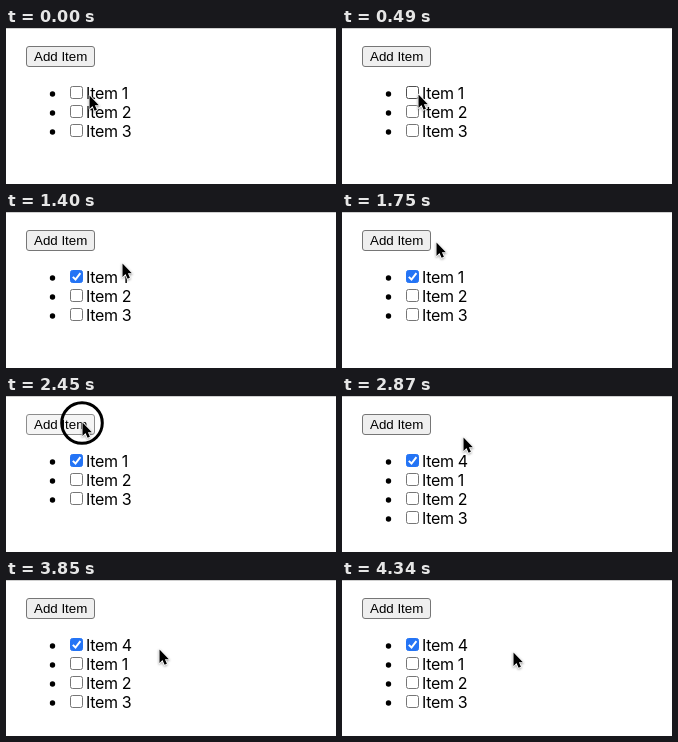
An HTML page that plays this animation: 330x156 px, repeating every 4.41 s.

```html
<!DOCTYPE html>
<html lang="en">
<head>
<meta charset="utf-8">
<title>Checkbox list</title>
<style>
html, body { margin: 0; width: 100%; height: 100%; overflow: hidden; background: #fff; }
svg { display: block; width: 330px; height: 156px; }
.label { font: 13.333px "Liberation Sans", Arial, sans-serif; }
.item { font: 16px Inter, Roboto, sans-serif; letter-spacing: -.35px; }
.button { fill: #efefef; stroke: #767676; }
.button.hover { fill: #e5e5e5; stroke: #4f4f4f; }
.button.active { fill: #f5f5f5; stroke: #8d8d8d; }
.box { fill: #fff; stroke: #767676; }
.hover .box { stroke: #4f4f4f; }
.checked .box { fill: #2474f5; stroke: #2474f5; }
.checked.hover .box { fill: #1b5cc5; stroke: #1b5cc5; }
.tick { fill: none; stroke: #fff; stroke-width: 2; visibility: hidden; }
.checked .tick { visibility: visible; }
#cursor { filter: drop-shadow(0 1px 1px rgba(0, 0, 0, .35)); }
</style>
</head>
<body>
<svg viewBox="0 0 330 156">
  <path d="M0 .5H330" stroke="#d0d0d0"/>
  <rect id="button" class="button" x="20.5" y="18.5" width="68" height="20" rx="2.5"/>
  <text class="label" x="28" y="33">Add Item</text>
  <g id="list"></g>
  <g id="cursor">
    <path d="M0 0V13.4L3 10.6 5.1 15.3 7.4 14.3 5.4 9.7H9.4Z"
      stroke="#fff" stroke-width="1.6" stroke-linejoin="round" paint-order="stroke"/>
  </g>
  <circle id="ring" r="20.3" fill="none" stroke="#000" stroke-width="3"/>
</svg>
<script>
const LOOP = 4410, STEP = 70;
const CHECK = 700, ADD = 2450;

// Each run: start time, then one pointer position per step.
const runs = [
  [0, [83, 67]],
  [210, [82, 67], [80, 67], [78, 66], [77, 66], [76, 66]],
  [980, [86, 64], [95, 61], [103, 58], [109, 55], [113, 53], [115, 52], [116, 51], [117, 51]],
  [1540, [116, 49], [110, 44], [102, 37], [94, 30], [87, 28], [81, 27], [77, 27], [76, 26]],
  [2730, [92, 29], [109, 35], [121, 41], [128, 47], [132, 52], [135, 57], [136, 60], [137, 62]],
  [3290, [138, 64], [140, 65], [142, 66], [146, 67], [149, 67]],
  [3710, [150, 68], [152, 69], [153, 69]],
  [3990, [155, 68], [159, 67], [164, 69], [168, 73], [170, 74], [171, 72]]
];

const $ = id => document.getElementById(id);
const button = $("button"), list = $("list"), cursor = $("cursor"), ring = $("ring");

list.innerHTML = [0, 1, 2, 3].map(i => `
  <g transform="translate(0 ${i * 19})">
    <circle cx="46.5" cy="66" r="2.7"/>
    <rect class="box" x="64.5" y="58.5" width="12" height="12" rx="2"/>
    <path class="tick" d="M66.8 64.9L69.5 67.5 74.4 61.2"/>
    <text class="item" x="80" y="71"></text>
  </g>`).join("");
const rows = [...list.children];
const labels = rows.map(row => row.querySelector("text"));

function pointerAt(t) {
  const [start, ...points] = runs.findLast(run => run[0] <= t);
  return points[Math.min(points.length - 1, Math.floor((t - start) / STEP))];
}

const during = (t, start) => t >= start && t < start + STEP;

function draw(t) {
  const [x, y] = pointerAt(t);
  const clicking = during(t, CHECK) || during(t, ADD);
  const added = t >= ADD + STEP;

  cursor.setAttribute("transform", `translate(${x + .5} ${y + .5})`);
  ring.setAttribute("cx", 76);
  ring.setAttribute("cy", t < ADD ? 66.5 : 27);
  ring.style.visibility = clicking ? "visible" : "hidden";

  button.classList.toggle("hover", x < 89 && y < 39);
  button.classList.toggle("active", during(t, ADD));
  rows[0].classList.toggle("checked", t >= CHECK + STEP);
  rows[0].classList.toggle("hover", t >= 350 && t < 1050);
  rows[3].style.visibility = added ? "visible" : "hidden";
  labels.forEach((label, i) => {
    label.textContent = "Item " + (added ? i || 4 : i + 1);
  });
}

function tick() {
  draw(performance.now() % LOOP);
  requestAnimationFrame(tick);
}
tick();
</script>
</body>
</html>
```
